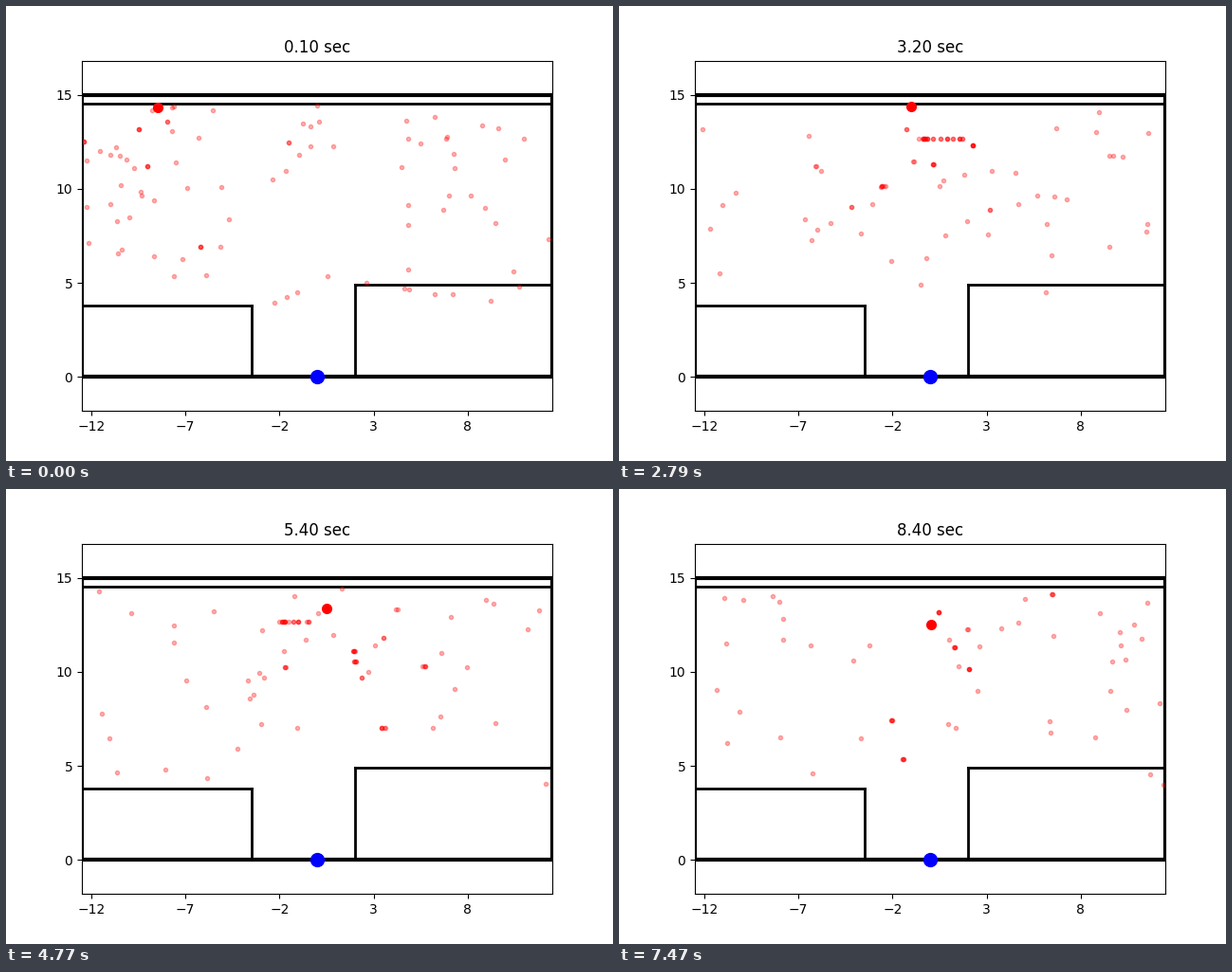
Recreate the animation shown at these times as a matplotlib script. Size 640 px wide and 480 px high, loop 7.56 s.

```python
import numpy as np
import matplotlib.pyplot as plt
from matplotlib.animation import FuncAnimation

FRAMES, STEP_MS = 84, 90
FLOOR, CEILING, SIDE = 3.9, 14.5, 12.4
ROW_START, ROW_END, ROW_Y = 8, 65, 12.65
rng = np.random.default_rng(12)

# Walk of the tracked target through a few way points
steps = np.arange(FRAMES)
way = [0, 12, 31, 47, 60, 71, 83]
target_x = np.interp(steps, way, [-8.45, -4, -1, 2.05, -1.25, -0.7, 0.05])
target_y = np.interp(steps, way, [14.3, 13.7, 14.4, 12.65, 14.25, 12.3, 12.5])


def settle(n):
    """Falls from 1 to 0 as the filter locks on."""
    return np.exp(-n / 4)


def make_loose(size=76):
    """Short-lived particles respawning anywhere in the room."""
    life = rng.integers(1, 5, size)
    phase = rng.integers(0, 5, size)
    x, y = np.zeros(size), np.zeros(size)
    history = []
    for n in steps:
        born = ((n + phase) % life == 0) | (n == 0)
        x = np.where(born, rng.uniform(-SIDE, SIDE, size),
                     x + rng.normal(0, 0.15, size))
        y = np.where(born, rng.uniform(FLOOR, CEILING, size), y)
        count = int(42 + (size - 42) * settle(n))
        history.append(np.column_stack([x, y])[:count])
    return history


def make_clumps():
    """Resampled copies near the target: fixed height, drifting sideways."""
    history = [[] for _ in steps]
    for birth in range(-8, FRAMES):
        n = max(birth, 0)
        x = np.clip(target_x[n] + rng.normal(1, 2.3 + 7 * settle(n)),
                    -SIDE, SIDE)
        y = rng.triangular(FLOOR, 13, CEILING)
        copies = rng.integers(2, 4 + 3 * (1 - settle(n)))
        xs = np.full(copies, x)
        for k in range(n, min(birth + rng.integers(5, 11), FRAMES)):
            history[k] += [(px, y) for px in xs]
            xs = xs + rng.normal(0, 0.1) + rng.normal(0, 0.02, copies)
    return history


loose = make_loose()
clumps = make_clumps()
row_unit = rng.choice(rng.normal(0, 1, 14), 28)


def row(n):
    """Long-lived family sharing one height that fans out and closes."""
    if not ROW_START <= n <= ROW_END:
        return []
    swell = np.sin(np.pi * (n - ROW_START) / (ROW_END - ROW_START))
    xs = 5 * swell - 4.5 + (0.1 + swell) * row_unit[:int(4 + 24 * swell)]
    return [(x, ROW_Y) for x in xs]


def wall(xs, ys, width):
    ax.plot(xs, ys, color="black", lw=width)


fig, ax = plt.subplots(figsize=(6.4, 4.8), dpi=100)
half = 12.5 * 369.6 / 496
ax.set_xlim(-12.5, 12.5)
ax.set_ylim(7.5 - half, 7.5 + half)
ax.set_xticks(np.arange(-12, 13, 5))
ax.set_yticks(np.arange(0, 16, 5))

for level in (0, 15):
    wall([-12.5, 12.5], [level, level], 3)
for side in (-12.5, 12.5):
    wall([side, side], [0, 15], 3)
wall([-12.5, 12.5], [14.53, 14.53], 2)
for side, edge, height in ((-12.5, -3.5, 3.8), (12.5, 2, 4.9)):
    wall([side, edge], [height, height], 2)
    wall([edge, edge], [0, height], 2)

cloud, = ax.plot([], [], "o", color="red", ms=3, alpha=0.3)
target, = ax.plot([], [], "o", color="red", ms=7)
ax.plot([0], [0], "o", color="blue", ms=10)
title = ax.set_title("")


def draw(n):
    pts = np.array([*loose[n], *clumps[n], *row(n)])
    cloud.set_data(pts[:, 0], pts[:, 1])
    target.set_data([target_x[n]], [target_y[n]])
    title.set_text(f"{(n + 1) / 10:.2f} sec")
    return cloud, target, title


anim = FuncAnimation(fig, draw, frames=FRAMES, interval=STEP_MS,
                     repeat=True, repeat_delay=0)
plt.show()
```
